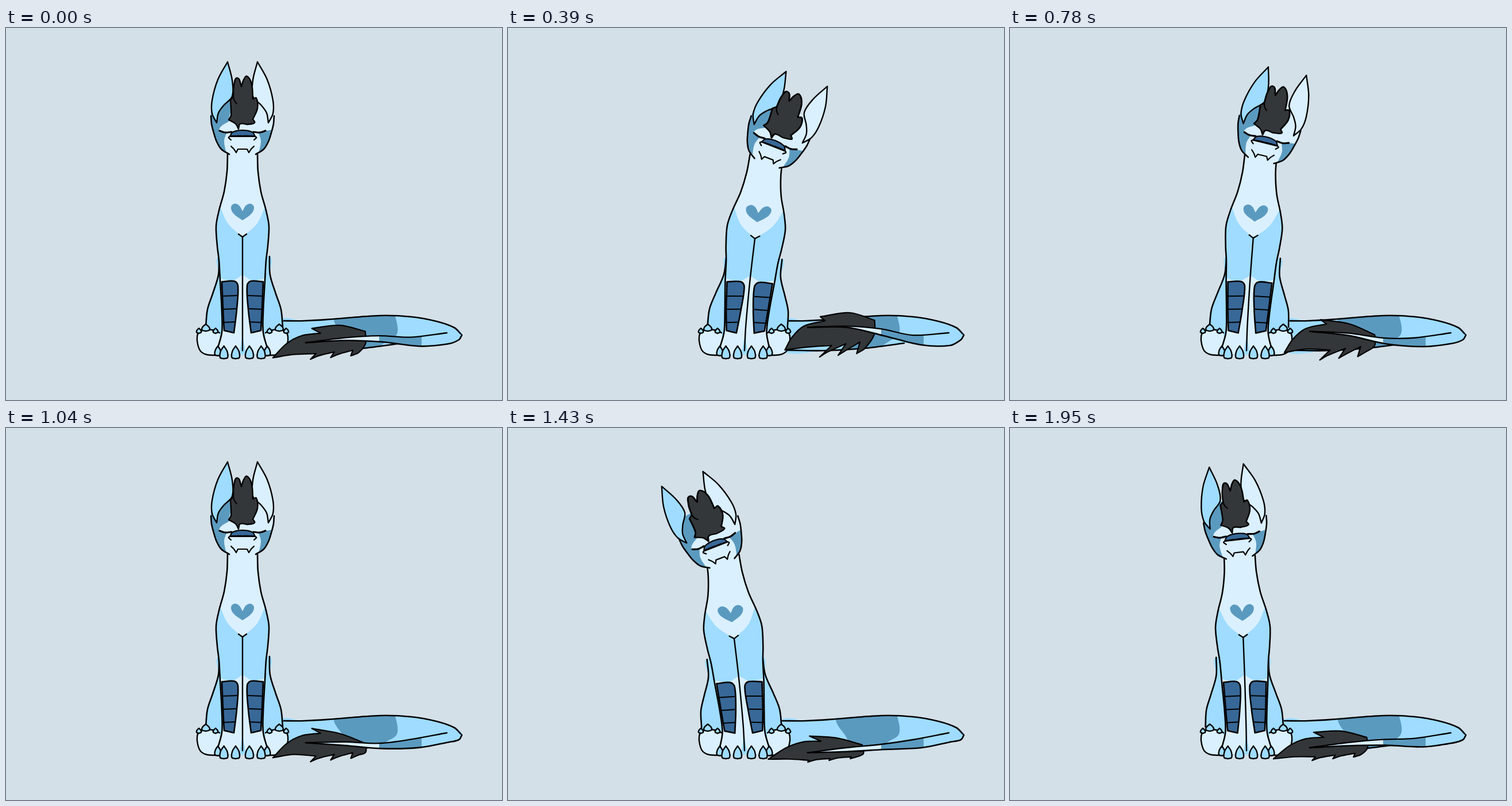
Recreate the animation shown at these times as an HTML page with a canvas. Size 864x648 px, loop 2080 ms.

```html
<!DOCTYPE html>
<html lang="en">
<head>
<meta charset="utf-8">
<title>Swaying creature</title>
<style>
html, body { margin: 0; width: 100%; height: 100%; overflow: hidden; background: #d4e0e8; }
canvas { display: block; width: 864px; height: 648px; }
</style>
</head>
<body>
<canvas id="stage" width="864" height="648"></canvas>
<script>
const ctx = document.getElementById('stage').getContext('2d');
const BG = '#d4e0e8', PALE = '#daf0ff', BLUE = '#9fdcff', MID = '#5b9abf',
      NAVY = '#386897', HAIR = '#343739', INK = '#000';
const STEP = 130, STEPS = 16, AXIS = 412;
const LEAN = [0, .32, .65, 1, 1.3];

// "x,y" is a smooth point, "x,y*" a sharp corner
const pt = (x, y, sharp = false) => ({ x, y, sharp });
const parse = s => s.split(' ').map(p => pt(...p.split(',').map(parseFloat), p.endsWith('*')));
const mirror = pts => pts.map(p => pt(-p.x, p.y, p.sharp));
const sided = (pts, side) => side < 0 ? mirror(pts) : pts;
const both = pts => [...pts, ...mirror(pts).reverse()];

function curve(pts, closed = true) {
  const n = pts.length, path = new Path2D();
  const at = i => closed ? pts[(i + n) % n] : pts[Math.max(0, Math.min(n - 1, i))];
  const handle = (i, len, sign) => {
    const p = at(i);
    const a = p.sharp && sign > 0 ? p : at(i - 1), b = p.sharp && sign < 0 ? p : at(i + 1);
    const dx = b.x - a.x, dy = b.y - a.y, d = Math.hypot(dx, dy) || 1;
    return [p.x + sign * dx / d * len / 3, p.y + sign * dy / d * len / 3];
  };
  path.moveTo(pts[0].x, pts[0].y);
  for (let i = 0; i < (closed ? n : n - 1); i++) {
    const p = at(i), q = at(i + 1), len = Math.hypot(q.x - p.x, q.y - p.y);
    path.bezierCurveTo(...handle(i, len, 1), ...handle(i + 1, len, -1), q.x, q.y);
  }
  return path;
}

function fill(path, color) {
  ctx.fillStyle = color;
  ctx.fill(path);
}
function ink(path, width = 2.6) {
  ctx.lineWidth = width;
  ctx.stroke(path);
}
function paint(path, color, width) {
  fill(path, color);
  ink(path, width);
}
function inside(path, draw) {
  ctx.save();
  ctx.clip(path);
  draw();
  ctx.restore();
}

// Right halves: x is the distance from the middle line
const hip = parse('44,398 45,430 55,463 64,490 67,520');
const flank = both([...hip, pt(44, 569, true)]);
const side = parse('26,218 27,250 32,285 41,318 46,345 44,380 41,405 39,440 36,495 36,530 43,557');
const trunk = both([pt(26, 195, true), ...side, ...parse('43,568* 6,568* 0,535*')]);
const coat = both(parse('0,364* 25,341 39,312* 60,300* 60,428* 20,440 0,430*'));
const heart = both(parse('0,335* 16,323 20,312 14,306 6,309 0,319*'));
const cuff = parse('36,442* 14,441 8,449 10,490 15,531* 32,527* 34,490');
const seam = parse('0,364 0,410 0,450 0,520 0,562');
const vee = both(parse('7,359* 0,364*'));

// Head parts, measured from between the eyes
const jaw = parse('55,-28 54,-14 50,2 45,17 37,30 23,39');
const skull = both([...parse('16,-64 38,-56 53,-42'), ...jaw]);
const ear = parse('26,-122* 18,-90 18,-62 33,-46 42,-33 45,-16* 53,-32 53,-55 43,-91');
const brow = parse('-60,-44 -38,-58 -14,-58 -22,-31 -24,-18* -38,-9 -46,5 -60,4');
const cheek = parse('56,-2 28,2* 32,16 28,38* 42,32 56,14');
const eye = parse('19,0 30,1 40,-2');
const nose = both(parse('22,8* 18,1 10,-2 0,-3'));
const snout = both(parse('20,14 24,9 12,7 0,7'));
const mouth = both(parse('20,25* 15,30 11,36* 8,30*'));
const mane = parse('-24,-21* -20,-29 -21,-56* -16,-61* -15,-81 -9,-94 -2,-79* 2,-91 8,-97 16,-83 18,-57* 24,-59 26,-41 18,-22* 21,-16 8,-13* -4,-14 -7,-5* -12,-14');
const lock = parse('-16,-61 -14,-54 -10,-49');

// Still parts
const tailTop = parse('476,510 520,510 570,507 650,501 705,503 750,511 781,522 794,535');
const tailUnder = parse('690,549 620,558 550,562 476,561');
const tail = curve([...tailTop, pt(770, 546), ...tailUnder]);
const band = curve(parse('569,495* 573,515 590,540 600,570* 645,558* 665,545 680,535 682,520 676,495*'));
const foot = parse('-40,531 -48,527 -64,525 -75,529 -79,537 -78,551 -73,563 -62,569 -36,570');

// The spine bends from the feet up; the chest widens and tilts with it
function bend(pts, k) {
  return pts.map(({ x, y, sharp }) => {
    const t = Math.max(0, 560 - y) / 340, wide = Math.abs(k) * .1 * Math.min(1, t * 3.4);
    return pt(AXIS + x * (1 + wide) + 38 * k * t ** 1.35, y + t * (.13 * k * x + 5 * Math.abs(k)), sharp);
  });
}

function claw(x, y, w, h) {
  const half = [pt(0, y), pt(w * .43, y + h * .4), pt(w / 2, y + h - 2), pt(0, y + h)];
  paint(curve(both(half).map(p => pt(p.x + x, p.y))), BLUE, 2.4);
}

function drawFoot(s) {
  const path = curve(sided(foot, s).map(p => pt(p.x + AXIS, p.y)), false);
  paint(path, PALE, 2.4);
  for (const dx of [76, 47]) claw(AXIS - s * dx, 523, 8, 9);
  claw(AXIS - s * 64, 516, 13, 12);
}

const wave = (phase, power) => ((1 + Math.sin(phase * 2 * Math.PI)) / 2) ** power;

// The tail's middle leads, its end follows a little later
function drawTailEnd(phase) {
  const u = wave(phase, 1.4), v = wave(phase + .08, 2);
  const barbs = [0, 1, 2].flatMap(i => {
    const x = 596 + 12 * u - i * (37 - 5 * u), y = 576 + 3 * i - 9 * v;
    return [pt(x + 14, y - 4 - 5 * u), pt(x, y, true),
            pt(x + 2 + (4 + 8 * i) * u, y - 3 - 18 * u, true)];
  });
  const tuft = curve([
    pt(453 + 31 * u, 577 - 18 * u * u, true),
    pt(485 + 10 * u, 557 - 19 * u),
    pt(515, 547 - 29 * u),
    pt(545 + 8 * u, 546 - 38 * u, true),
    pt(525 + 20 * u, 537 - 36 * u, true),
    pt(572 + 25 * u, 540 - 30 * v - 15 * u),
    pt(617 + 23 * u, 552 - 43 * v, true),
    pt(619 + 20 * u, 567 - 33 * v),
    ...barbs,
    pt(490 + 30 * u, 577 - 22 * u)
  ]);
  paint(tuft, HAIR, 2.2);

  const tip = pt(522, 566 - 47 * u, true);
  const top = [tip, pt(590, 557 - 24 * u - 15 * v), pt(650, 551 - 27 * v), pt(705, 543 - 8 * v), pt(768, 531)];
  const under = [tip, pt(590, 564 - 26 * u - 18 * v), pt(655, 560 - 24 * v), pt(720, 557 - 5 * v),
                 pt(770, 547 + 6 * v), pt(789, 543), pt(794, 535)];
  const area = curve([...top, ...under.slice(1).reverse()]);
  fill(area, BLUE);
  inside(area, () => {
    ctx.fillStyle = MID;
    ctx.fillRect(650, 490, 74, 100);
    ctx.fillStyle = PALE;
    ctx.fillRect(500, 490, 150, 100);
  });
  ink(curve(top, false), 2.3);
  ink(curve(under, false));
}

function drawBody(k) {
  const shape = (pts, closed) => curve(bend(pts, k), closed);
  const body = shape(trunk);
  fill(body, PALE);
  inside(body, () => fill(shape(coat), BLUE));
  fill(shape(heart), MID);
  for (const s of [-1, 1]) {
    paint(shape(sided(cuff, s)), NAVY);
    for (let i = 0; i < 3; i++) {
      const y = 466 + 23 * i;
      ink(shape(sided([pt(9 + 2 * i, y), pt(35, y + 1)], s), false), 2);
    }
    ink(shape(sided(side, s), false));
  }
  ink(shape(seam, false), 2.4);
  ink(shape(vee, false), 2.4);
}

function drawEar(s, k) {
  const splay = Math.max(0, s * k) * 13 * Math.PI / 180;
  ctx.save();
  ctx.translate(s * 45, -16);
  ctx.rotate(s * splay);
  ctx.translate(-s * 45, 16);
  paint(curve(sided(ear, s)), s < 0 ? BLUE : PALE, 2.4);
  ctx.restore();
}

function drawHead(k) {
  const lean = Math.abs(k), head = curve(skull);
  ctx.save();
  ctx.translate(AXIS + 53 * k, 181 + 18 * lean);
  ctx.rotate(k * 21 * Math.PI / 180);
  fill(head, PALE);
  inside(head, () => {
    fill(curve(brow), MID);
    for (const s of [-1, 1]) fill(curve(sided(cheek, s)), MID);
  });
  for (const s of [-1, 1]) {
    drawEar(s, k);
    ink(curve(sided(jaw, s), false));
    ink(curve(sided(eye, s), false), 3.2);
  }
  paint(curve(nose), NAVY, 2.2);
  ink(curve(snout, false), 2.2);
  ink(curve(mouth, false), 2.2);
  ctx.scale(1 + .2 * lean, 1 - .04 * lean);
  paint(curve(mane), HAIR, 2.4);
  ink(curve(lock, false), 2);
  ctx.restore();
}

function render(step) {
  const turn = step % 8, k = LEAN[Math.min(turn, 8 - turn)] * (step > 8 ? -1 : 1);
  const shift = k < 0 ? -3 : 3;
  ctx.fillStyle = BG;
  ctx.fillRect(0, 0, 864, 648);
  ctx.strokeStyle = INK;
  ctx.lineCap = ctx.lineJoin = 'round';

  fill(tail, BLUE);
  inside(tail, () => fill(band, MID));
  ink(curve(tailTop, false));
  ink(curve(tailUnder, false));

  ctx.save();
  ctx.translate(shift, 0);
  fill(curve(bend(flank, k)), BLUE);
  for (const s of [-1, 1]) ink(curve(bend(sided(hip, s), k), false));
  ctx.restore();

  for (const s of [-1, 1]) drawFoot(s);
  drawTailEnd(step / STEPS);
  drawBody(k);
  for (const s of [-1, 1]) {
    claw(AXIS + s * 43, 554, 10, 17);
    for (const dx of [12, 32.5]) claw(AXIS + s * dx, 554, 13, 22);
  }
  drawHead(k);
}

const start = performance.now();
let shown = -1;
function tick() {
  const step = Math.floor((performance.now() - start) / STEP) % STEPS;
  if (step !== shown) render(shown = step);
  requestAnimationFrame(tick);
}
tick();
</script>
</body>
</html>
```
